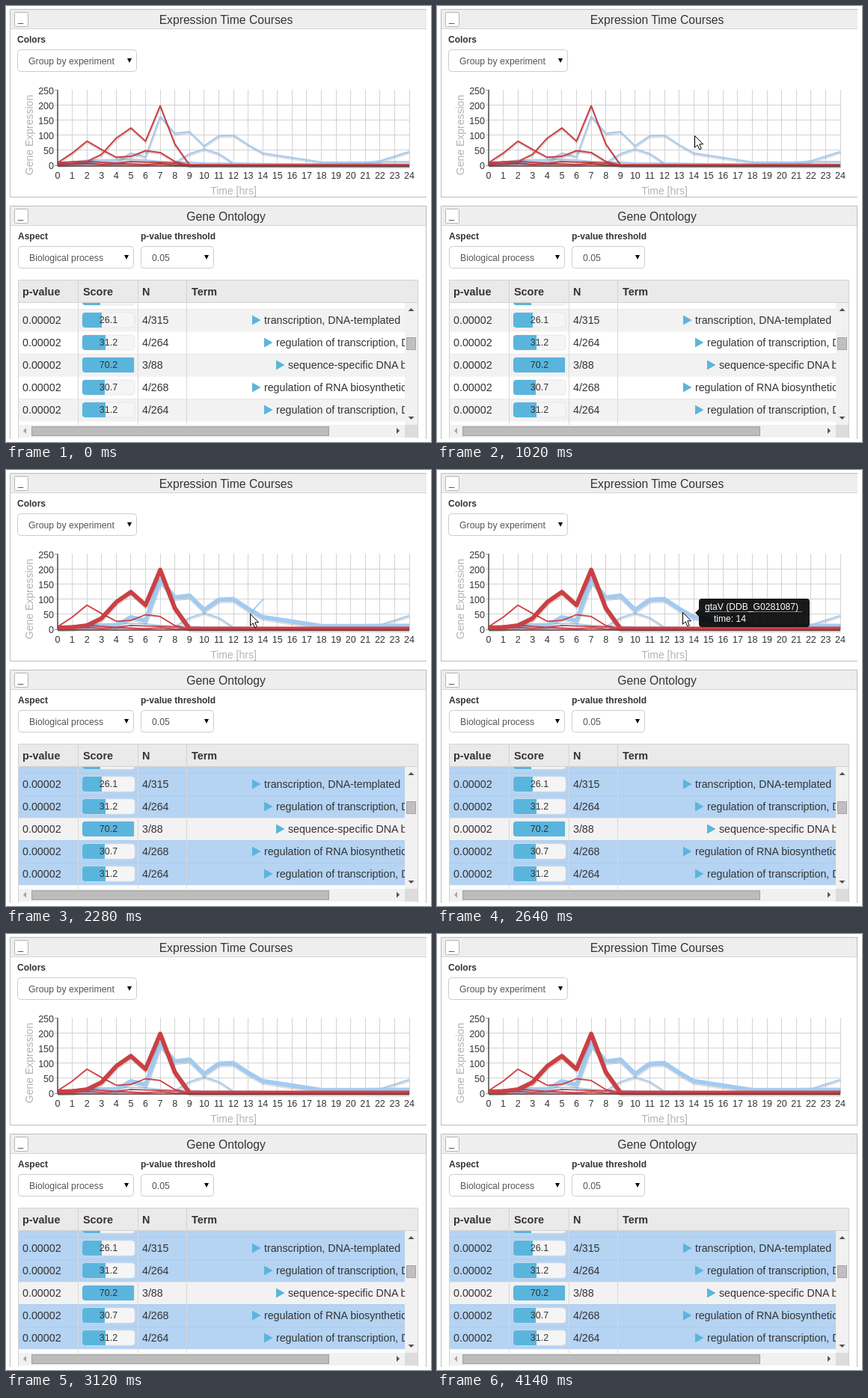
An HTML page for the animation above (5400 ms loop, 568 by 583 pixels).

```html
<!DOCTYPE html>
<html lang="en">
<head>
<meta charset="utf-8">
<title>Expression dashboard</title>
<style>
html, body { margin: 0; width: 100%; height: 100%; overflow: hidden; background: #fff; }
svg { display: block; width: 568px; height: 583px; font-family: "Liberation Sans", Arial, sans-serif; }
text { fill: #333; white-space: pre; }
</style>
</head>
<body>
<svg id="stage" viewBox="0 0 568 583"></svg>
<script>
const NS = 'http://www.w3.org/2000/svg';
const stage = document.getElementById('stage');
const RED = '#cb4043', BLUE = '#a3caf1', BAR = '#5ab5dd';

function el(parent, tag, attrs = {}, content) {
  const node = document.createElementNS(NS, tag);
  for (const key in attrs) node.setAttribute(key, attrs[key]);
  if (content !== undefined) node.textContent = content;
  parent.appendChild(node);
  return node;
}
const group = (parent, attrs) => el(parent, 'g', attrs);
const rect = (p, x, y, width, height, fill, more) =>
  el(p, 'rect', { x, y, width, height, fill, ...more });
const path = (p, d, fill, more) => el(p, 'path', { d, fill, ...more });
const line = (p, d, stroke, width = 1) =>
  path(p, d, 'none', { stroke, 'stroke-width': width });
const text = (p, x, y, size, content, more) =>
  el(p, 'text', { x, y, 'font-size': size, ...more }, content);
const bold = { 'font-weight': 'bold' };
const middle = { 'text-anchor': 'middle' };

// Draws a panel and returns its right border
function panel(y, height, title) {
  rect(stage, 6, y + 1, 556, 26, '#eee');
  line(stage, `M6 ${y + 26.5}H562`, '#d6d6d6');
  line(stage, `M562 ${y + .5}H5.5V${y + height + .5}H562`, '#bdbdbd');
  rect(stage, 11.5, y + 4.5, 18, 19, '#fff', { stroke: '#b5b5b5', rx: 1 });
  text(stage, 16, y + 17, 13, '_');
  text(stage, 294, y + 20, 15.7, title, middle);
  return line(stage, `M561.5 ${y}V${y + height + 1}`, '#bdbdbd');
}

function select(x, y, width, label) {
  rect(stage, x + .5, y + .5, width, 29, '#fff', { stroke: '#ccc', rx: 4 });
  text(stage, x + 15, y + 20, 12.3, label, { style: 'fill:#555' });
  path(stage, `M${x + width - 12} ${y + 12}h6l-3 6z`, '#000');
}

// Chart
const px = hour => 69 + hour * 470 / 24;
const py = value => 213 - value * .4;
const trace = points => 'M' + points.map(([h, v]) => `${px(h)} ${py(v) + .5}`).join('L');
const byHour = values => values.map((v, h) => [h, v]);

const redPeak = [...byHour([7, 8, 14, 38, 92, 126, 82, 200, 72, 3]), [24, 3]];
const redEarly = [...byHour([10, 42, 82, 54, 28, 31, 50, 44, 14, 2]), [24, 1]];
const redFlat = [...byHour([10, 13, 15, 11, 8, 14, 12, 11, 9, 1]), [24, 0]];
const redLow = [...byHour([3, 6, 8, 4, 7, 5, 3, 6, 2, 0]), [24, 0]];
const bluePeak = [...byHour([6, 7, 10, 12, 14, 42, 30, 165, 108, 114, 66, 100, 102, 70, 42]),
  [16, 27], [18, 12], [21, 12], [22, 13], [24, 13]];
const blueLate = [...byHour([2, 3, 5, 4, 3, 5, 4, 6, 10, 40, 56, 40, 8]),
  [14, 6], [18, 4], [21, 8], [22, 16], [24, 47]];
const blueFlat = [...byHour([5, 12, 18, 19, 20, 21, 19, 14, 12, 11, 9]), [14, 7], [24, 4]];

function series(parent, points, color, width, shadow) {
  const attrs = { stroke: color, 'stroke-width': width, 'stroke-linejoin': 'round' };
  if (shadow) path(parent, trace(points), 'none',
    { ...attrs, stroke: '#000', opacity: .13, 'stroke-width': width + .8, transform: 'translate(.5 1.8)' });
  path(parent, trace(points), 'none', attrs);
}

const chartEdge = panel(4, 251, 'Expression Time Courses');
text(stage, 15, 49, 12, 'Colors', bold);
select(15, 58, 159, 'Group by experiment');

for (let h = 1; h <= 24; h++) line(stage, `M${Math.floor(px(h)) + .5} 112V213`, '#d3d3d3');
for (let v = 50; v <= 200; v += 50) line(stage, `M65 ${py(v) - .5}H539`, '#d3d3d3');
line(stage, 'M65 112.5H69M65 213.5H69', '#999');
for (let h = 0; h <= 24; h++) text(stage, px(h), 231, 12.5, h, middle);
for (let v = 0; v <= 250; v += 50) text(stage, 64, py(v) + 4.5, 12.5, v, { 'text-anchor': 'end' });
text(stage, 0, 0, 14, 'Gene Expression',
  { ...middle, transform: 'translate(36 172.5) rotate(-90)', style: 'fill:#b3b3b3' });
text(stage, 304, 252, 14, 'Time [hrs]', { ...middle, style: 'fill:#b3b3b3' });

const plain = group(stage), picked = group(stage);
for (const s of [blueFlat, blueLate, bluePeak]) series(plain, s, BLUE, 2, true);
for (const s of [redLow, redFlat, redEarly, redPeak]) series(plain, s, RED, 2, true);
series(picked, blueFlat, BLUE, 1.8);
series(picked, blueLate, BLUE, 1.8, true);
series(picked, bluePeak, BLUE, 5.8, true);
for (const s of [redLow, redFlat, redEarly]) series(picked, s, RED, 1.8);
series(picked, redPeak, RED, 5.8, true);
line(stage, 'M69 112V214', '#555', 1.6);
line(stage, 'M69 214H539', '#5a4145', 1.4);

// Ontology table
panel(267, 340, 'Gene Ontology');
text(stage, 16, 312, 12, 'Aspect', bold);
text(stage, 180, 312, 12, 'p-value threshold', bold);
select(16, 321, 154, 'Biological process');
select(180, 321, 97, '0.05');

const rows = [
  ['26.1', '4/315', 329, 'transcription, DNA-templated', true],
  ['31.2', '4/264', 345, 'regulation of transcription, DNA-templated', true],
  ['70.2', '3/88', 361, 'sequence-specific DNA binding', false],
  ['30.7', '4/268', 329, 'regulation of RNA biosynthetic process', true],
  ['31.2', '4/264', 345, 'regulation of transcription, DNA-templated', true],
];
const clip = el(stage, 'clipPath', { id: 'body' });
rect(clip, 16, 397, 517, 163);
const table = group(stage, { 'clip-path': 'url(#body)' });
rows.forEach((r, i) => { if (i % 2 === 0) rect(table, 17, 405 + i * 30, 516, 30, '#f2f2f2'); });
const marks = group(table);
rect(marks, 17, 397, 516, 8, '#b5d3f2');
rows.forEach((r, i) => { if (r[4]) rect(marks, 17, 405 + i * 30, 516, 30, '#b5d3f2'); });
for (let y = 405; y < 560; y += 30) line(table, `M17 ${y + .5}H533`, 'rgba(0,0,0,.03)');
line(table, 'M96.5 397V560M176.5 397V560M241.5 397V560', '#d8d8d8');

function scoreBar(y, score) {
  rect(table, 102, y - 10, 70, 20, '#f5f5f5', { rx: 4, stroke: '#e4e4e4', 'stroke-width': .8 });
  const w = Math.floor(Math.min(score, 69));
  path(table, `M${102 + w} ${y - 10}H106q-4 0-4 4v12q0 4 4 4H${102 + w}z`, BAR);
}
scoreBar(390, 24);
rows.forEach(([score, n, x, term], i) => {
  const y = 420 + i * 30;
  scoreBar(y, +score);
  text(table, 22, y + 5, 14.3, '0.00002');
  text(table, 137, y + 4, 12.5, score, middle);
  text(table, 182, y + 5, 14.2, n);
  path(table, `M${x} ${y - 6.5}l11.5 6.5l-11.5 6.5z`, BAR);
  text(table, x + 16, y + 5, 14.2, term);
});

rect(stage, 16.5, 366.5, 534, 30, '#eaeaea', { stroke: '#d2d2d2' });
line(stage, 'M96.5 367V397M176.5 367V397M241.5 367V397', '#d2d2d2');
[[22, 'p-value'], [103, 'Score'], [182, 'N'], [248, 'Term']]
  .forEach(([x, label]) => text(stage, x, 387, 14.4, label, bold));

// Scrollbars
rect(stage, 533, 397, 17, 163, '#f1f1f1');
rect(stage, 17, 560, 516, 17, '#f1f1f1');
rect(stage, 533, 560, 17, 17, '#dcdcdc');
rect(stage, 535.5, 443.5, 12, 16, '#bfbfbf', { stroke: '#a6a6a6' });
rect(stage, 34.5, 562.5, 397, 12, '#bcbcbc', { stroke: '#a0a0a0' });
path(stage, 'M537.5 408h8l-4-4zM537.5 549h8l-4 4zM522 564v8l4-4z', '#505050');
path(stage, 'M27 564v8l-4-4z', '#a3a3a3');
line(stage, 'M16.5 397V578M550.5 397V578', '#d2d2d2');
rect(stage, 0, 579, 568, 4, '#fff');

// Pointer, trail and tooltip
const trail = line(stage, '', '#84c3d8', 1.3);
const tip = group(stage);
rect(tip, 350, 172, 148, 38, '#000', { rx: 4, opacity: .9 });
path(tip, 'M350 186v10l-5-5z', '#000', { opacity: .9 });
line(tip, 'M358 189.5H488', '#5385a3');
text(tip, 358, 187, 12.1, 'gtaV (DDB_G0281087)', { style: 'fill:#fff' });
text(tip, 370, 203, 12.1, 'time: 14', { style: 'fill:#fff' });
const pointer = path(stage, 'M.5 .5V16.2L4.1 12.8L6.7 18.8L9.3 17.7L6.8 11.8H11.6Z', '#fff',
  { stroke: '#000', 'stroke-width': 1 });

// [time, opacity] steps, each held until the next
const pointerSteps = [[0, 0], [960, .5], [1020, 1], [3000, .5], [3120, 0]];
const tipSteps = [[0, 0], [2520, .3], [2580, .65], [2640, 1], [3000, .5], [3120, 0]];
const held = (steps, t) => steps.filter(s => s[0] <= t).pop()[1];
const ramp = (t, from, to) => Math.min(1, Math.max(0, (t - from) / (to - from)));
const show = (node, on) => node.setAttribute('visibility', on ? 'visible' : 'hidden');

function draw(time) {
  const t = Math.floor(time / 60) * 60;
  const on = t >= 2280;
  show(plain, !on);
  show(picked, on);
  show(marks, on);
  chartEdge.setAttribute('opacity', ramp(t, 3780, 4140));

  const move = ramp(t, 1260, 1680);
  let x = 344 - 18 * move, y = 173 + 19 * move;
  if (t >= 2520) { x = 328; y = 190; }
  pointer.setAttribute('transform', `translate(${x} ${y})`);
  pointer.setAttribute('opacity', held(pointerSteps, t));
  tip.setAttribute('opacity', held(tipSteps, t));
  trail.setAttribute('d', `M344 172.5L${x} ${y}`);
  show(trail, move > 0 && t < 2520);
}

const start = performance.now();
function tick() {
  draw((performance.now() - start) % 5400);
  requestAnimationFrame(tick);
}
draw(0);
requestAnimationFrame(tick);
</script>
</body>
</html>
```
